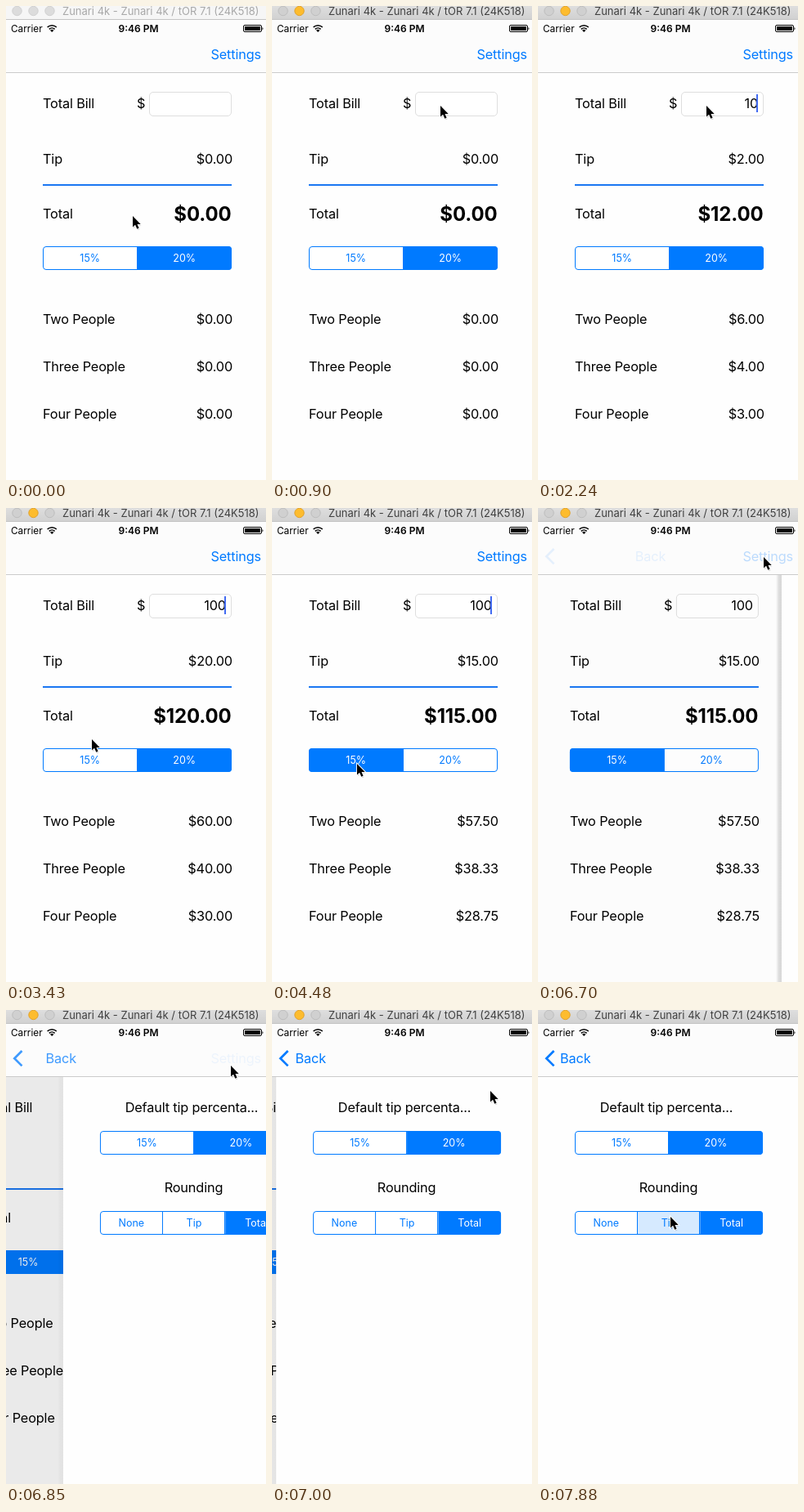
An HTML page for the animation above (8 s loop, 318 by 580 pixels).

```html
<!DOCTYPE html>
<html lang="en">
<head>
<meta charset="utf-8">
<title>Tip calculator</title>
<style>
  html, body { margin: 0; width: 100%; height: 100%; overflow: hidden; background: #fff; }
  svg { display: block; width: 318px; height: 580px; font: 16.3px Inter, "Liberation Sans", sans-serif; letter-spacing: -.15px; }
  text { white-space: pre; }
  .end { text-anchor: end; }
  .mid { text-anchor: middle; }
  .link { fill: #007aff; }
  .small { font-size: 12.5px; letter-spacing: 0; }
  .big { font-size: 24px; font-weight: 700; }
</style>
</head>
<body>
<svg id="stage" viewBox="0 0 318 580">
  <defs>
    <linearGradient id="edge"><stop offset="0" stop-opacity="0"/><stop offset=".5" stop-opacity=".13"/><stop offset="1" stop-opacity=".16"/></linearGradient>
    <linearGradient id="chrome" x2="0" y2="1"><stop offset="0" stop-color="#dedede"/><stop offset="1" stop-color="#d0d0d0"/></linearGradient>
  </defs>
  <rect width="318" height="580" fill="#fefefe"/>
  <g id="main"></g>
  <rect id="dim" y="82" width="318" height="498"/>
  <g id="prefs">
    <rect id="shade" x="-7" y="82" width="7" height="498" fill="url(#edge)"/>
    <rect y="82" width="318" height="498" fill="#fefefe"/>
  </g>
  <rect y="17" width="318" height="64" fill="#fcfcfc"/>
  <rect y="81" width="318" height="1" fill="#cbcbcb"/>
  <g id="status">
    <text x="6" y="32" style="font-size:11.8px;letter-spacing:0">Carrier</text>
    <g fill="none" stroke="#000" stroke-width="1.6">
      <path d="M50.6 26A8 8 0 0 1 61.8 26"/>
      <path d="M52.8 28.3A4.9 4.9 0 0 1 59.6 28.3"/>
    </g>
    <path d="M56.2 32L54 29.7A3.2 3.2 0 0 1 58.4 29.7Z"/>
    <text class="mid" x="162" y="32" style="font-size:12px;font-weight:600;letter-spacing:0">9:46 PM</text>
    <rect x="290.5" y="23.5" width="22" height="8" rx="1.5" fill="none" stroke="#000"/>
    <rect x="292" y="25" width="19" height="5"/>
    <path d="M313.5 26Q315.5 27.5 313.5 29.5Z"/>
  </g>
  <text id="open" class="link end" x="312" y="65">Settings</text>
  <g id="back" class="link">
    <path d="M19.5 50L10.3 59.2L19.5 68.4" fill="none" stroke="#007aff" stroke-width="2.7"/>
    <text id="backText" y="65">Back</text>
  </g>
  <g id="window">
    <rect id="bar" width="318" height="17"/>
    <rect y="16" width="318" height="1" fill="#c4c4c4"/>
    <circle class="light" cx="13.5" cy="6" r="5.7"/>
    <circle class="light" id="amber" cx="33.5" cy="6" r="5.7"/>
    <circle class="light" cx="53.5" cy="6" r="5.7"/>
    <text id="title" x="69" y="11" style="font-size:13px;letter-spacing:0">Zunari 4k - Zunari 4k / tOR 7.1 (24K518)</text>
  </g>
  <g id="mouse">
    <path d="M1 1.5V15L4 12.3L6.2 17.3L8.6 16.3L6.5 11.4H10.4Z" fill="#000" opacity=".2"/>
    <path d="M0 0V13.6L3.1 10.7L5.3 15.8L7.6 14.8L5.5 9.9H9.7Z" stroke="#fff" stroke-width="1.8" paint-order="stroke"/>
  </g>
</svg>
<script>
const LOOP = 8000, BLUE = '#007aff', WIDTH = 318;
const $ = id => document.getElementById(id);

// Every track holds rows of [start ms, ...values]; a row stays until the next.
const mouseTrack = [
  [0, 155, 257], [150, 148, 182], [450, 158, 170], [600, 184, 141], [750, 206, 122],
  [2840, 202, 130], [2990, 180, 172], [3140, 148, 222], [3280, 118, 262], [3430, 105, 283],
  [3580, 104, 304], [3730, 104, 313],
  [5810, 116, 295], [5960, 160, 232], [6110, 212, 150], [6250, 252, 92], [6400, 272, 66],
  [6550, 276, 60], [6850, 275, 68], [7000, 267, 99], [7150, 244, 146], [7300, 204, 208],
  [7440, 174, 243], [7590, 163, 252], [7740, 162, 253]
];
const caretTrack = [
  [0, 0], [1050, 1], [2990, .5], [3140, 0], [3280, .5], [3430, 1],
  [4030, .5], [4180, 0], [4330, .5], [4480, 1], [4930, .4], [5080, 0], [5370, .5], [5520, 1],
  [5960, .4], [6110, 0], [6400, .5], [6550, 1], [6700, 0]
];
const billTrack = [[0, ''], [1650, '1'], [2240, '10'], [2390, '100']];
// selected segment, pressed segment
const rateTrack = [[0, 1, -1], [3880, 1, 0], [4030, 0, -1]];
const roundTrack = [[0, 2, -1], [7880, 2, 1]];
// page progress, back opacity, settings opacity
const pushTrack = [
  [0, 0, 0, 1], [6550, 0, 0, .3], [6700, .063, .09, .25],
  [6850, .78, .75, .06], [7000, .984, 1, 0], [7150, 1, 1, 0]
];

function at(track, t) {
  let row = track[0];
  for (const r of track) if (r[0] <= t) row = r;
  return row.slice(1);
}

function add(parent, tag, attrs, text) {
  const el = document.createElementNS('http://www.w3.org/2000/svg', tag);
  for (const k in attrs) el.setAttribute(k, attrs[k]);
  if (text !== undefined) el.textContent = text;
  return parent.appendChild(el);
}

const label = (parent, x, y, text, cls = '') => add(parent, 'text', { x, y, class: cls }, text);

let clips = 0;
function segments(parent, x, y, width, names) {
  const id = 'clip' + clips++, w = width / names.length;
  const box = { x, y, width, height: 29, rx: 4 };
  add(add(parent, 'clipPath', { id }), 'rect', box);
  const fills = add(parent, 'g', { 'clip-path': `url(#${id})` });
  const cells = names.map((name, i) => {
    const left = x + w * i;
    const rect = add(fills, 'rect', { x: left, y, width: w, height: 29 });
    if (i) add(parent, 'rect', { x: Math.round(left) - 1, y, width: 1, height: 29, fill: BLUE });
    return { rect, text: label(parent, left + w / 2, y + 19, name, 'small mid') };
  });
  add(parent, 'rect', { x: x + .5, y: y + .5, width: width - 1, height: 28, rx: 3.5, fill: 'none', stroke: BLUE });
  return ([picked, pressed]) => cells.forEach(({ rect, text }, i) => {
    rect.setAttribute('fill', i === picked ? BLUE : i === pressed ? '#d6eaff' : '#fff');
    text.setAttribute('fill', i === picked ? '#fff' : BLUE);
  });
}

const main = $('main'), prefs = $('prefs');
label(main, 45, 125, 'Total Bill');
label(main, 160, 125, '$');
add(main, 'rect', { x: 175.5, y: 105.5, width: 100, height: 29, rx: 4.5, fill: '#fff', stroke: '#dedede' });
const billText = label(main, 269, 125, '', 'end');
const caret = add(main, 'rect', { x: 267, y: 108, width: 2, height: 22, fill: '#426bf2' });
add(main, 'rect', { x: 45, y: 218, width: 231, height: 2, fill: '#1a77f2' });

const amounts = [
  ['Tip', 193, (bill, rate) => bill * rate],
  ['Total', 260, (bill, rate) => bill * (1 + rate)],
  ['Two People', 389, (bill, rate) => bill * (1 + rate) / 2],
  ['Three People', 447, (bill, rate) => bill * (1 + rate) / 3],
  ['Four People', 505, (bill, rate) => bill * (1 + rate) / 4]
].map(([name, y, value]) => {
  const total = name === 'Total';
  label(main, 45, y, name);
  return { value, el: label(main, total ? 275.5 : 277, total ? 263 : y, '', total ? 'big end' : 'end') };
});
const showRate = segments(main, 45, 294, 231, ['15%', '20%']);

label(prefs, 157, 125, 'Default tip percenta...', 'mid');
segments(prefs, 45, 148, 230, ['15%', '20%'])([1, -1]);
label(prefs, 159.5, 223, 'Rounding', 'mid');
const showRounding = segments(prefs, 45, 246, 230, ['None', 'Tip', 'Total']);

const move = (el, x, y = 0) => el.setAttribute('transform', `translate(${x} ${y})`);
const fade = (el, o) => el.setAttribute('opacity', o);

function showWindow(active) {
  $('bar').setAttribute('fill', active ? 'url(#chrome)' : '#f6f6f6');
  $('title').setAttribute('fill', active ? '#404040' : '#a8a8a8');
  document.querySelectorAll('.light').forEach(el => {
    el.setAttribute('fill', active ? '#d0d0d0' : '#dcdcdc');
    el.setAttribute('stroke', active ? '#bdbdbd' : '#d0d0d0');
  });
  if (active) {
    $('amber').setAttribute('fill', '#fdbc2e');
    $('amber').setAttribute('stroke', '#e2a128');
  }
}

function draw(t) {
  move($('mouse'), ...at(mouseTrack, t));
  showWindow(t >= 900);

  const [bill] = at(billTrack, t), rate = at(rateTrack, t);
  billText.textContent = bill;
  fade(caret, at(caretTrack, t)[0]);
  showRate(rate);
  showRounding(at(roundTrack, t));
  for (const { el, value } of amounts) {
    el.textContent = '$' + value(+bill, rate[0] ? .2 : .15).toFixed(2);
  }

  const [p, backFade, openFade] = at(pushTrack, t);
  move(main, -.305 * WIDTH * p);
  move(prefs, WIDTH * (1 - p));
  prefs.setAttribute('visibility', p ? 'visible' : 'hidden');
  fade($('dim'), .1 * p);
  fade($('shade'), 1 - p);
  fade($('back'), backFade);
  fade($('open'), openFade);
  $('backText').setAttribute('x', 27 + 98 * (1 - p));
}

const start = performance.now();
function tick() {
  draw((performance.now() - start) % LOOP);
  requestAnimationFrame(tick);
}
tick();
</script>
</body>
</html>
```
